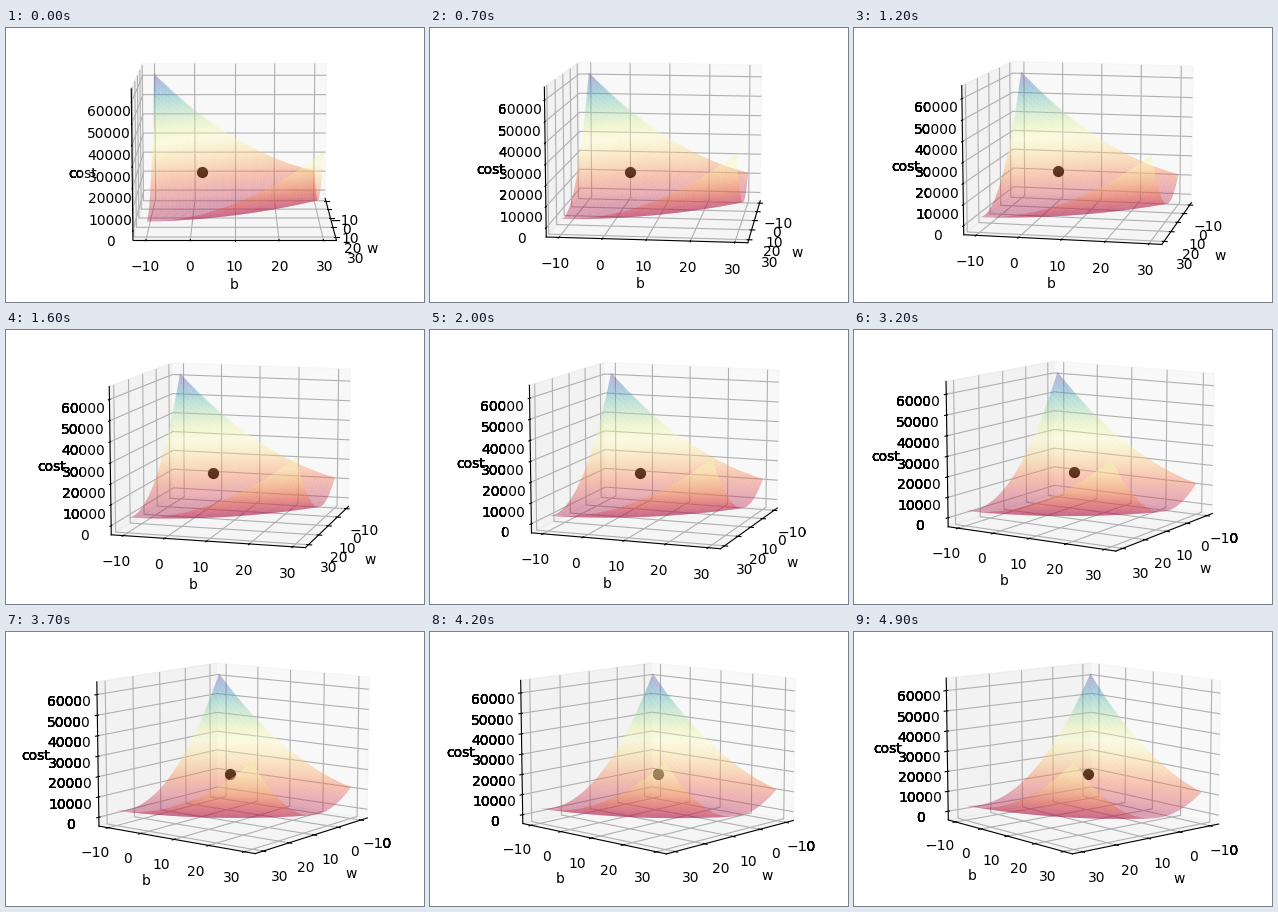
Recreate the animation shown at these times as a matplotlib script. Size 418x274 px, loop 5 s.

```python
import numpy as np
import matplotlib.pyplot as plt
from matplotlib.animation import FuncAnimation

WIDTH, HEIGHT, DPI = 418, 274, 100
FRAMES, INTERVAL = 50, 100
SIDE, LEFT, BOTTOM = 300, 74.6, 0.7
ELEVATION = 10
COPIES = 6


def cost(w, b):
    u, v = w - 10, b - 10
    return 1012 - 425.6 * u - 215.6 * v + 47.5 * u**2 + 52 * u * v + 20 * v**2


def add_axes():
    box = [LEFT / WIDTH, BOTTOM / HEIGHT, SIDE / WIDTH, SIDE / HEIGHT]
    ax = fig.add_axes(box, projection="3d", computed_zorder=False)
    ax.set(xlim=(-12.917, 32.917), ylim=(-12.917, 32.917), zlim=(-4400, 66100))
    ax.set(xticks=range(-10, 31, 10), yticks=range(-10, 31, 10),
           zticks=range(0, 60001, 10000))
    ax.set(xlabel="w", ylabel="b", zlabel="cost")
    return ax


fig = plt.figure(figsize=(WIDTH / DPI, HEIGHT / DPI), dpi=DPI)

# Stacked copies darken the text that falls outside the top axes' patch.
layers = [add_axes() for _ in range(COPIES)]
top = layers[-1]
for ax in layers[:-1]:
    ax.grid(False)
    ax.patch.set_visible(False)

grid = np.linspace(-10, 30, 50)
W, B = np.meshgrid(grid, grid)
top.plot_surface(W, B, cost(W, B), cmap="Spectral", alpha=0.4, zorder=2)
top.scatter([1.25], [2], [cost(1.25, 2)], color="black", s=50, zorder=1)


def update(frame):
    for ax in layers:
        ax.view_init(elev=ELEVATION, azim=frame)
    return []


anim = FuncAnimation(fig, update, frames=FRAMES, interval=INTERVAL,
                     init_func=lambda: [], repeat=True, repeat_delay=0)
plt.show()
```
